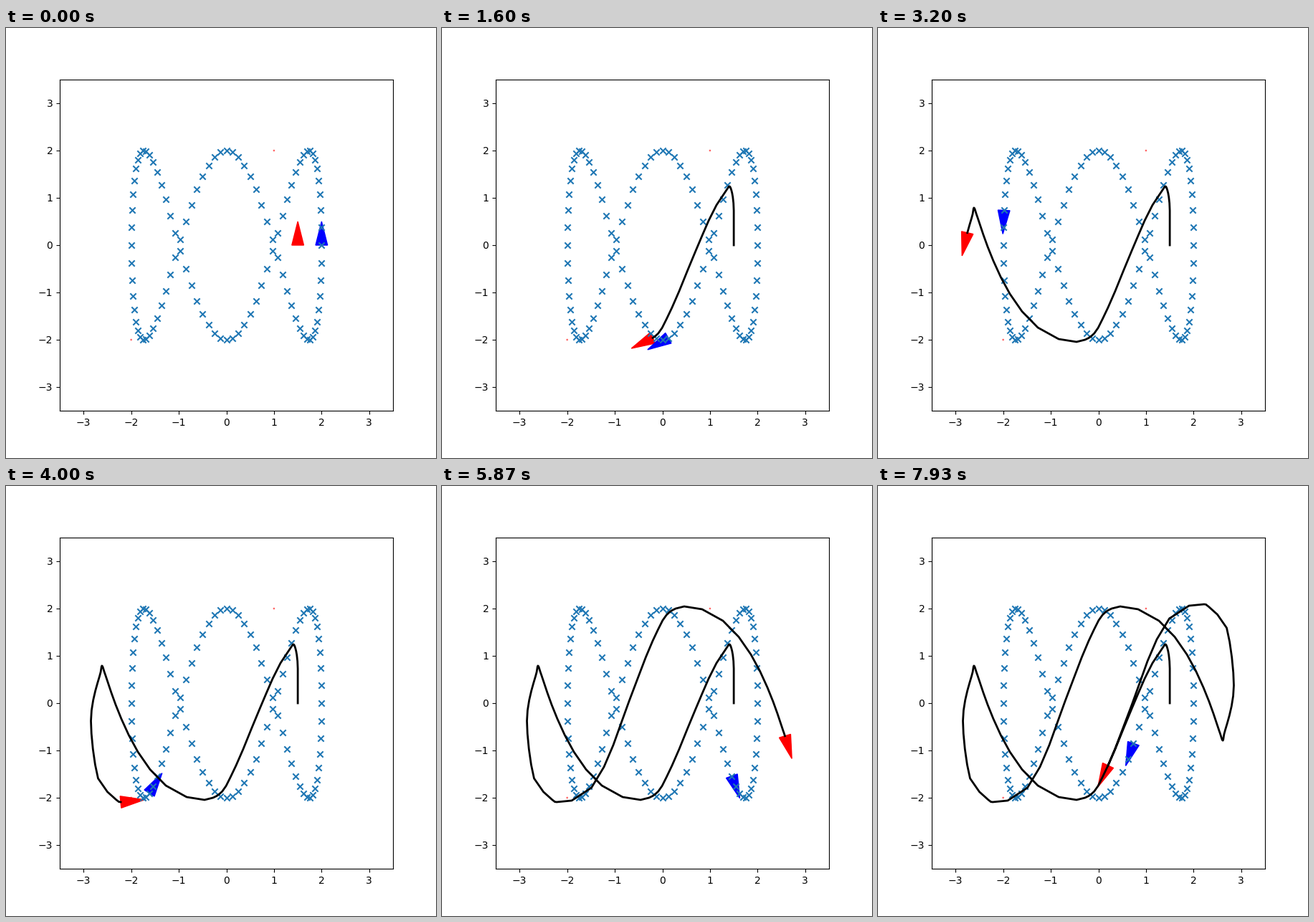
A matplotlib script for the animation above (8 s loop, 600 by 600 pixels).

```python
import numpy as np
import matplotlib.pyplot as plt
from matplotlib.animation import FuncAnimation
from matplotlib.patches import Circle, Polygon

FRAMES = 120
LAP = 100  # steps for one lap of the curve

# Key points of the follower: step, x, y
START = np.array([
    (0, 1.5, 0), (3, 1.5, .73), (6, 1.465, 1.1), (11, 1.405, 1.245),
    (12, 1.39, 1.23), (13, 1.137, .848), (16, .7, -.12),
])
HALF_LAP = np.array([
    (19, .203, -1.318), (22, -.088, -1.867), (25, -.28, -2.0),
    (26, -.459, -2.045), (27, -.835, -1.985), (28, -1.272, -1.742),
    (30, -1.859, -1.03), (33, -2.325, -.035), (36, -2.537, .583),
    (42, -2.615, .79), (45, -2.64, .66), (51, -2.845, -.375),
    (55, -2.695, -1.591), (57, -2.311, -2.045), (60, -2.22, -2.091),
    (61, -1.904, -2.06), (62, -1.49, -1.788), (63, -1.227, -1.348),
    (66, -.7, .04),
])


def smooth(t, tk, yk):
    """Monotone cubic interpolation through the keys."""
    h = np.diff(tk)
    d = np.diff(yk) / h
    m = np.zeros(len(yk))
    m[0], m[-1] = d[0], d[-1]
    for i in range(1, len(d)):
        if d[i - 1] * d[i] > 0:
            a, b = 2 * h[i] + h[i - 1], h[i] + 2 * h[i - 1]
            m[i] = (a + b) / (a / d[i - 1] + b / d[i])
    i = np.clip(np.searchsorted(tk, t, side="right") - 1, 0, len(h) - 1)
    s = (t - tk[i]) / h[i]
    return (yk[i] * (1 + 2 * s) * (1 - s) ** 2 + h[i] * m[i] * s * (1 - s) ** 2
            + yk[i + 1] * s * s * (3 - 2 * s) + h[i] * m[i + 1] * s * s * (s - 1))


def follower_path():
    # each half lap is the previous one turned about the centre
    laps = [HALF_LAP * (1, sign, sign) + (shift, 0, 0)
            for shift, sign in ((0, 1), (50, -1), (100, 1))]
    keys = np.vstack([START, *laps])
    t = np.arange(FRAMES + 1)
    return np.column_stack([smooth(t, keys[:, 0], keys[:, c]) for c in (1, 2)])


def curve(step):
    t = 2 * np.pi * step / LAP
    return np.round([2 * np.cos(t), 2 * np.sin(3 * t)], 9)


def curve_velocity(step):
    t = 2 * np.pi * step / LAP
    return np.array([-2 * np.sin(t), 6 * np.cos(3 * t)])


def arrowhead(pos, velocity, length=0.5, half=0.125):
    ahead = velocity / np.hypot(*velocity)
    side = np.array([-ahead[1], ahead[0]])
    return np.array([pos + half * side, pos + length * ahead, pos - half * side])


path = follower_path()
moves = np.diff(path, axis=0)

fig, ax = plt.subplots(figsize=(6, 6), dpi=100)
ax.set_xlim(-3.5, 3.5)
ax.set_ylim(-3.5, 3.5)

for spot in ((1, 2), (-2, -2)):
    ax.add_patch(Circle(spot, 0.02, color="red", alpha=0.6, lw=0))

red = ax.add_patch(Polygon(arrowhead(path[0], moves[0]), color="red"))
blue = ax.add_patch(Polygon(arrowhead(curve(0), curve_velocity(0)), color="blue"))
ax.scatter(*curve(np.arange(LAP)), marker="x", color="C0")
trail, = ax.plot([], [], color="black", lw=2)


def update(i):
    red.set_xy(arrowhead(path[i], moves[i]))
    blue.set_xy(arrowhead(curve(i), curve_velocity(i)))
    trail.set_data(path[:i + 1, 0], path[:i + 1, 1])
    return red, blue, trail


anim = FuncAnimation(fig, update, frames=FRAMES, interval=66.63,
                     repeat=True, repeat_delay=0)
plt.show()
```
